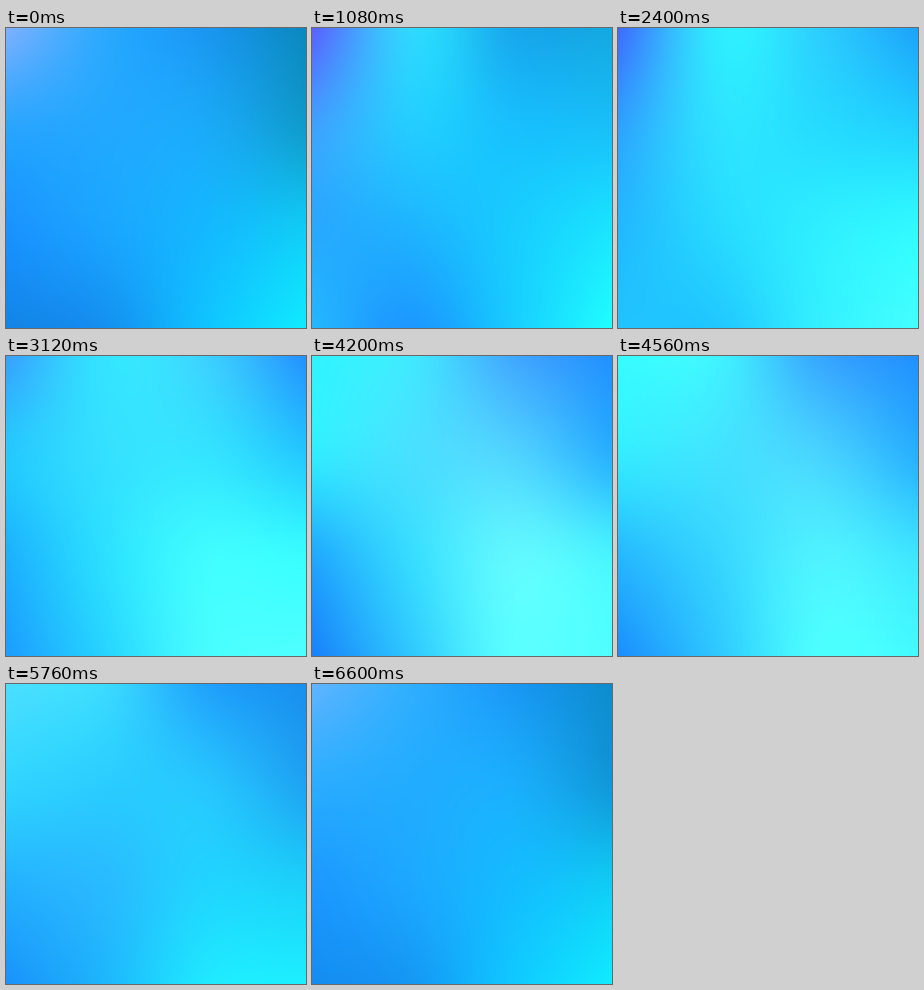
These frames come from a looping animation (300 by 300 pixels, 6.72 s). An HTML page with a canvas:

```html
<!DOCTYPE html>
<html lang="en">
<head>
<meta charset="utf-8">
<title>Drifting blue gradient</title>
<style>
  html, body { margin: 0; width: 100%; height: 100%; overflow: hidden; background: #1eaaff; }
  canvas { display: block; width: 100vw; height: 100vh; }
</style>
</head>
<body>
<canvas id="stage" width="300" height="300"></canvas>
<script>
const SIZE = 300, LOOP = 6720, STEP = 120, N = 4;

// Mesh gradient poses: time, then four rows of four colours.
const poses = [
  [0,
    '7fb0ff 2ca8ff 1a96f0 0a88be',
    '2aa4ff 22a8ff 1aaaf8 0f9ccc',
    '1a92ff 1aa5ff 14b8ff 10ccf4',
    '1284e6 1490f0 10c4ff 10ecff'],
  [1080,
    '5a60ff 30d8ff 18a8ec 14a8e0',
    '40a0ff 24ccff 18c0fc 18c0f8',
    '28a8ff 1eb4ff 18ccff 1ae4ff',
    '24b8ff 1c98ff 18ccff 20ffff'],
  [1680,
    '484cff 2cf4ff 1cc8fc 14b4f0',
    '3c88ff 28e4ff 1cccff 1cd4ff',
    '28bcff 22ccff 20d8ff 28f4ff',
    '24e0ff 1cb0ff 20dcff 30ffff'],
  [3120,
    '38a0ff 34e4ff 3cd0ff 2490ff',
    '24c8ff 34e0ff 34e4ff 24c8ff',
    '1cb0ff 2ce0ff 40fcff 38fcff',
    '1c9cff 28d4ff 48fcff 50ffff'],
  [4200,
    '30f4ff 40e8ff 40a8ff 2090ff',
    '30ecff 48e0ff 50d4ff 28b0ff',
    '20a8ff 38dcff 60f8ff 48f4ff',
    '1880f8 30c8ff 58ffff 50ffff'],
  [4800,
    '3cffff 40f8ff 30a8ff 2090ff',
    '34ecff 3ce4ff 40d4ff 28b0ff',
    '28c0ff 34d0ff 40ecff 34dcff',
    '1c94ff 2cc8ff 40ffff 38f8ff'],
  [6600,
    '60b4ff 30aeff 1a98f4 0c8ccc',
    '2cacff 22acff 1aaefc 1098d8',
    '1c98ff 1ca8ff 14bcff 10ccf4',
    '148cf0 1498f4 10c8ff 10ecff']
].map(([time, ...rows]) => ({
  time,
  mesh: rows.join(' ').split(' ').flatMap(hex =>
    [0, 2, 4].map(i => parseInt(hex.slice(i, i + 2), 16)))
}));

const poseAt = i => {
  const n = poses.length, turn = Math.floor(i / n), p = poses[i - turn * n];
  return { time: p.time + turn * LOOP, mesh: p.mesh };
};

// Monotone tangent: flat at a turning point, harmonic mean elsewhere.
const tangent = (a, b) => a * b <= 0 ? 0 : 2 * a * b / (a + b);

function meshAt(t) {
  let i = poses.length - 1;
  while (poses[i].time > t) i--;
  const [a, b, c, d] = [-1, 0, 1, 2].map(k => poseAt(i + k));
  const span = c.time - b.time, u = (t - b.time) / span;
  const ease = u * u * (3 - 2 * u);
  return b.mesh.map((v, k) => {
    const before = (v - a.mesh[k]) / (b.time - a.time);
    const here = (c.mesh[k] - v) / span;
    const after = (d.mesh[k] - c.mesh[k]) / (d.time - c.time);
    return v + (c.mesh[k] - v) * ease
      + tangent(before, here) * span * u * (1 - u) * (1 - u)
      - tangent(here, after) * span * u * u * (1 - u);
  });
}

// Catmull-Rom weights of the four mesh lines at each pixel.
const weights = Array.from({ length: SIZE }, (_, px) => {
  const p = (px + 0.5) / SIZE * (N - 1), i = Math.floor(p), u = p - i;
  const w = [0, 0, 0, 0];
  const add = (j, v) => {
    if (j < 0) { w[0] += 2 * v; w[1] -= v; }
    else if (j >= N) { w[N - 1] += 2 * v; w[N - 2] -= v; }
    else w[j] += v;
  };
  add(i - 1, (-u + 2 * u * u - u * u * u) / 2);
  add(i, (2 - 5 * u * u + 3 * u * u * u) / 2);
  add(i + 1, (u + 4 * u * u - 3 * u * u * u) / 2);
  add(i + 2, (u * u * u - u * u) / 2);
  return w;
});

const ctx = document.getElementById('stage').getContext('2d');
const image = ctx.createImageData(SIZE, SIZE);

function draw(t) {
  const mesh = meshAt(t), width = N * 3, line = new Float64Array(width);
  let out = 0;
  for (const wy of weights) {
    for (let k = 0; k < width; k++) {
      line[k] = wy[0] * mesh[k] + wy[1] * mesh[k + width]
        + wy[2] * mesh[k + 2 * width] + wy[3] * mesh[k + 3 * width];
    }
    for (const wx of weights) {
      for (let c = 0; c < 3; c++) {
        image.data[out++] = wx[0] * line[c] + wx[1] * line[c + 3]
          + wx[2] * line[c + 6] + wx[3] * line[c + 9];
      }
      image.data[out++] = 255;
    }
  }
  ctx.putImageData(image, 0, 0);
}

const start = performance.now();
let shown = -1;
function tick() {
  const t = Math.floor((performance.now() - start) % LOOP / STEP) * STEP;
  if (t !== shown) draw(shown = t);
  requestAnimationFrame(tick);
}
tick();
</script>
</body>
</html>
```
